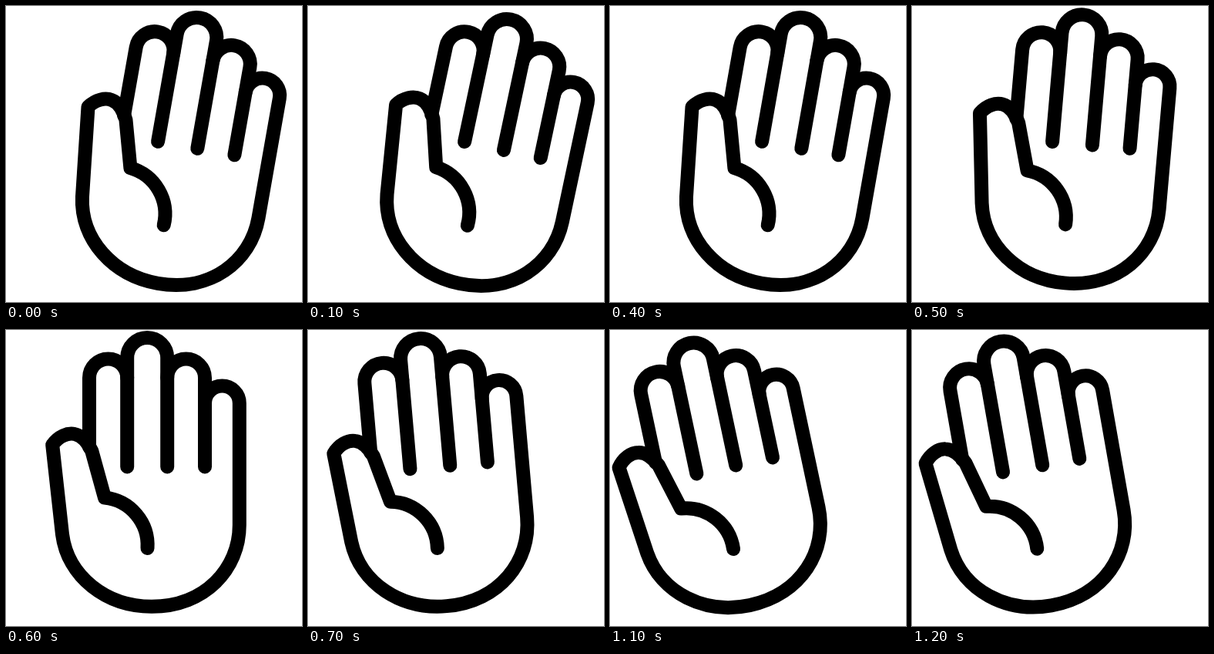
An HTML page that plays this animation: 384x384 px, repeating every 1.3 s.

```html
<!DOCTYPE html>
<html lang="en">
<head>
<meta charset="utf-8">
<title>Waving hand</title>
<style>
  html, body { margin: 0; width: 100%; height: 100%; overflow: hidden; background: #fff; }
  svg { display: block; width: 100%; height: 100%; }
</style>
</head>
<body>
<svg viewBox="0 0 384 384">
  <g id="hand" fill="none" stroke="#000" stroke-width="18" stroke-linecap="round" stroke-linejoin="round">
    <!-- fingers, from index to little -->
    <path d="M108 152V62A24.6 24.6 0 0 1 157.2 62"/>
    <path d="M157.2 177.5V36A26 26 0 0 1 209.2 36V177.5"/>
    <path d="M209.2 62A24.4 24.4 0 0 1 258 62V177.5"/>
    <!-- little finger, palm, thumb and crease -->
    <path d="M258 95A22.4 22.4 0 0 1 302.8 95V253
      C302.8 310 258 358.8 189 358.8
      C130 358.8 80 320 73 265
      L60.2 149
      C68 138 80 133 89 135
      C99.5 137 106 146 111.3 157
      L128 217.5
      A62 62 0 0 1 183.5 283"/>
  </g>
</svg>
<script>
  const hand = document.getElementById('hand');
  const STEP = 100, STEPS = 13, SHIFT = 10;
  const TILT = [0, 5, 10, 12, 13]; // degrees, easing out towards the end of a swing

  function draw(now) {
    const i = Math.floor(now / STEP) % STEPS;
    const side = Math.sign(6 - i);
    const peak = i > 6 ? 10 : 2;
    const angle = side * TILT[4 - Math.abs(i - peak)];
    hand.setAttribute('transform', `translate(${side * SHIFT} 0) rotate(${angle} 182 347.5)`);
  }

  const start = performance.now();
  function tick() {
    draw(performance.now() - start);
    requestAnimationFrame(tick);
  }
  tick();
</script>
</body>
</html>
```
